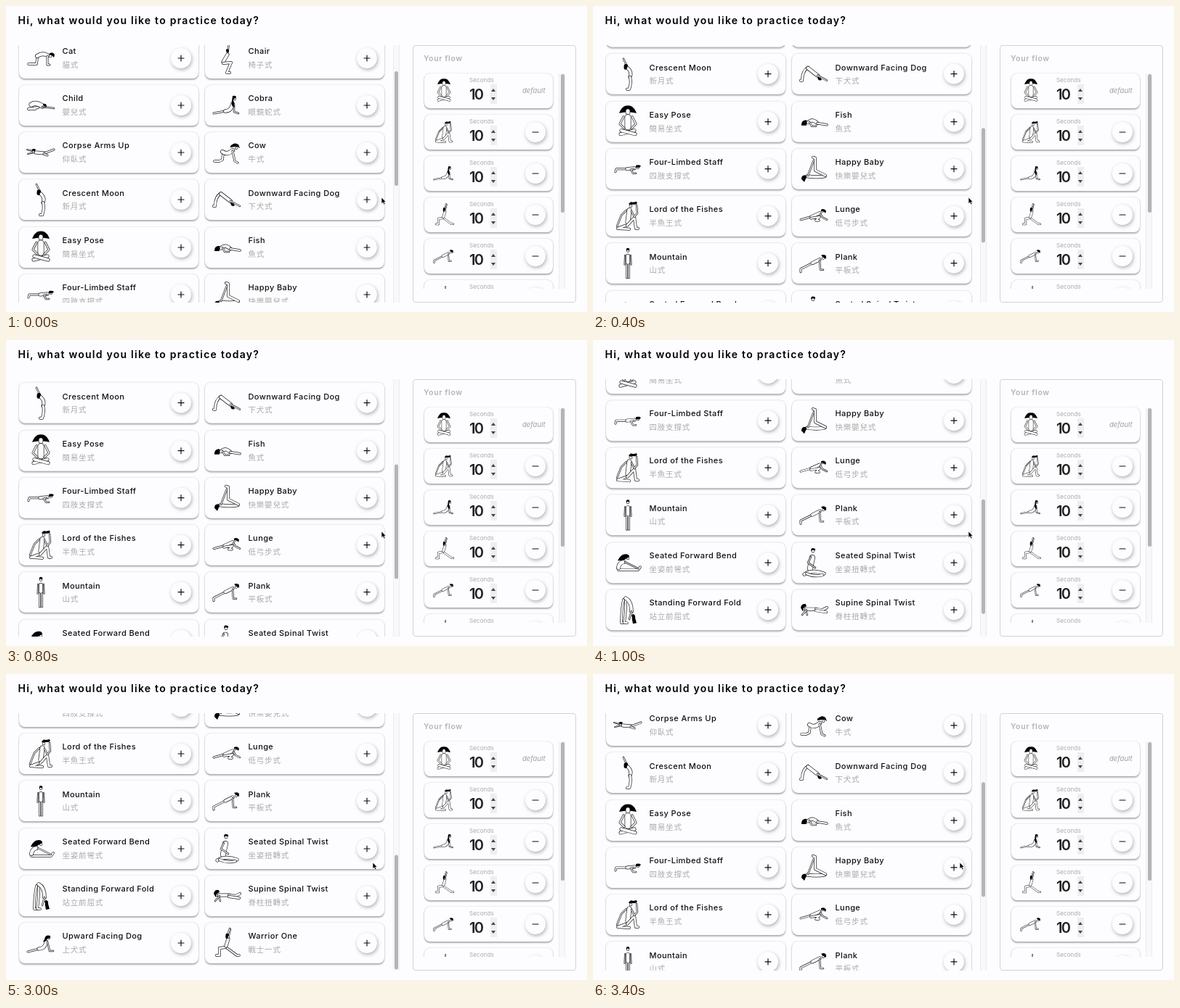
An HTML page for the animation above (3500 ms loop, 800 by 422 pixels).

```html
<!DOCTYPE html>
<html lang="en">
<head>
<meta charset="utf-8">
<title>Yoga flow</title>
<style>
html, body { margin: 0; width: 100%; height: 100%; overflow: hidden; background: #fdfcfe; }
body { position: relative; font-family: Poppins, Inter, sans-serif; color: #111; }
body *, svg { position: absolute; box-sizing: border-box; white-space: nowrap; }
svg * { position: static; }
h1, h2 { margin: 0; line-height: 20px; }
h1 { left: 16.5px; top: 10px; font-size: 14px; font-weight: 600; letter-spacing: 1.25px; color: #000; }
h2 { left: 14px; top: 8px; font-size: 10.5px; font-weight: 600; letter-spacing: .65px; color: #b4b4b6; }
#grid { left: 10px; top: 54px; width: 522px; height: 355px; overflow: hidden; }
#panel { left: 560px; top: 54px; width: 225px; height: 355px; border: 1px solid #d2d1d4; border-radius: 4px; }
#flow { left: 8px; top: 37px; width: 190px; height: 298px; overflow: hidden; }
.card { border-radius: 8px; background: #fdfcfe; box-shadow: 0 2px 2px rgba(0,0,0,.28), 0 0 2px rgba(0,0,0,.22); }
.pose { width: 247px; height: 56px; }
.step { left: 7px; width: 177px; height: 48px; }
.pose .figure { left: 6px; top: 0; width: 48px; height: 56px; }
.step .figure { left: 9px; top: 3px; width: 36px; height: 42px; }
.name, .zh { left: 59.5px; line-height: 16px; }
.name { top: 10.2px; font-size: 11px; font-weight: 500; letter-spacing: .4px; }
.zh { top: 29px; font: 10.5px/16px "Noto Sans CJK TC", "Noto Sans CJK", sans-serif; letter-spacing: .8px; color: #aaa; }
.btn { width: 28px; height: 28px; border-radius: 50%; background: #fdfcfe; box-shadow: 1px 2px 5px rgba(0,0,0,.3); stroke: #111; stroke-width: 1.2; }
.pose .btn { left: 209px; top: 14px; }
.step .btn { left: 139px; top: 10px; }
.sec { left: 62px; top: 3px; font-size: 8px; line-height: 12px; letter-spacing: .1px; color: #a8a8aa; }
.num { left: 62px; top: 17px; font-size: 20px; line-height: 24px; font-weight: 600; letter-spacing: -1.6px; color: #222; }
.spin { left: 91px; top: 15px; width: 9px; height: 27px; background: #eeeef0; }
.spin::before, .spin::after { content: ""; position: absolute; left: 1px; border: solid transparent; border-width: 0 3.5px; }
.spin::before { top: 6px; border-bottom: 4px solid #444; }
.spin::after { top: 18px; border-top: 4px solid #444; }
.def { left: 135px; top: 16px; font-size: 9.5px; line-height: 16px; font-style: italic; color: #a0a0a2; }
.track { width: 9px; background: #f8f7f9; border: solid #ecebed; border-width: 0 1px; }
.thumb { left: 1px; width: 5px; border-radius: 3px; background: #b4b3b6; }
#cursor { left: 0; top: 0; width: 8px; height: 11px; overflow: visible; }
</style>
</head>
<body>
<h1>Hi, what would you like to practice today?</h1>
<div id="grid"><div id="list"></div></div>
<div class="track" style="left:533px;top:54px;height:355px"><div class="thumb" id="thumb" style="top:36px;height:158px"></div></div>
<div id="panel">
  <h2>Your flow</h2>
  <div id="flow"></div>
  <div class="track" style="left:200px;top:38px;height:297px"><div class="thumb" style="left:2px;top:1px;height:191px"></div></div>
</div>
<svg id="cursor" viewBox="0 0 8 11"><path d="M0 0V8.5L2 6.8L3.5 10L5 9.3L3.6 6.2H6.2Z" fill="#000" stroke="#fff" stroke-width=".6"/></svg>
<script>
// Each figure is a list of strokes "width + path", drawn as outlined limbs; width 0 is solid hair.
const poses = [
  ["Cat", "貓式", "3.5M-17 8H-6L-5-1|6M-5-3Q2-8 9-4|3M9-3L9 9H12|4.5M13-3h0|0M11-6q5-4 8 1l-1 4-3-3z"],
  ["Chair", "椅子式", "2.5M1-6L3-20|5M1-5L-5 5|4M-5 7L6 6L0 20H4|4M1-10h0|0M-1-12q3-2 4 1l-1 3q-3 0-3-4z"],
  ["Child", "嬰兒式", "4M-8 5H-17L-4 3|7M-13-1Q-7-5 2 1|2.5M2 2L18 4|4.5M5 1h0|0M3-2q5-1 5 4-4 1-5-4z"],
  ["Cobra", "眼鏡蛇式", "3M-18 11L-2 8|5.5M-2 8Q6 8 8-2|2.5M10-2L10 9L16 11|4M11-9h0|0M8-13q5-1 5 2l-4 3 1 5 1 6q-6-2-4-9z"],
  ["Corpse Arms Up", "仰臥式", "2M-9-1L-19-4|2M-9 0L-18 2|5M-7 0L5 1|3M5 1L18-4|3M4 2L9 4|4M-10-1h0|0M-13-4q4-2 6 0l-2 3z"],
  ["Cow", "牛式", "3.5M-17 12H-10L-6 10L-5 0|6M-6-1Q1 4 8-3|3M8-2L11 12L15 14|4M13-6h0|0M5-9q6-6 11-2l2 5q-4-3-7-2l-6 1z"],
  ["Crescent Moon", "新月式", "2.5M0-8L-6-21|5M0-8Q6-2 3 4|4M3 4Q5 12 2 21H-1|4M-2-11h0|0M-5-13q4-2 5 1l-2 6q-5 1-3-7z"],
  ["Downward Facing Dog", "下犬式", "4M-8-9Q-16-4-16 9H-18|5.5M-8-8L5 2|2.5M5 2L18 9|4M8 6h0|0M5 4q5 1 6 4-5 3-6-4z"],
  ["Easy Pose", "簡易坐式", "0M-12-12Q-9-20-4-22Q0-23 4-22Q9-20 12-12Q0-15-12-12z|6.5M0-15v2|9M0-6V7|3M-6-7L-11 3L-5 9|3M6-7L11 3L5 9|5M-10 17L9 12|5M10 17L-9 12"],
  ["Fish", "魚式", "5M-8 1Q-2-5 5 2|3.5M5 2L18 4|2.5M-6 0L-3 6H3|4.5M-11 0h0|0M-17 5q0-8 7-7l0 7z"],
  ["Four-Limbed Staff", "四肢支撐式", "3M-17 4L-16 0L0 0|5M-1 0L9-1|2.5M8 0L4 1L7 6H11|4M14-2h0|0M11-5q5-1 7 1l-2 2-5 0z"],
  ["Happy Baby", "快樂嬰兒式", "5M-9 10Q4 12 15 10|4M16 9L2 2L2-15L-1-16|2.5M-8 9L0-12|4.5M-12 11h0|0M-17 14q0-6 6-5l1 2-3 7z"],
  ["Lord of the Fishes", "半魚王式", "2.5M-2-8L-9-1L-15 14|7M2-8L0 8|4M-3 13L-14 17L2 18|4M-1 13L9 2L11 17H14|2.5M5-7L9 1L13-4L12-15|4.5M4-14h0|0M1-16q2-5 6-3l5-1q2 3-2 4l-4 0z"],
  ["Lunge", "低弓步式", "3M-18 5L-4 1|5M-3 1L8-4|3.5M-4 3L8 1L3 6H7|2.5M9-3L12 2L18 5|4M12-7h0|0M10-9q5-2 7 2l-1 3q-2-3-6-3z"],
  ["Mountain", "山式", "4M0-17h0|6M0-10V0|2M-4-11L-4.500 2|2M4-11L4.500 2|3M-1.500 2V20|3M1.500 2V20|0M-2-17q-1-4 2-4 3 0 2 4l-2-2z"],
  ["Plank", "平板式", "3M-18 12V8L-2 0|5M-2 0L8-5|2.5M8-4L9 9H13|4M13-7h0|0M10-11q5-2 7 1l0 4-4-2z"],
  ["Seated Forward Bend", "坐姿前彎式", "3.5M-13 10L14 10L17 6|6M-13 7Q-12 0-6-1|2.5M-4-1L14 8|4M0-6h0|0M-14-3q4-9 11-9 5 0 5 4l-4 2q-5 4-12 3z"],
  ["Seated Spinal Twist", "坐姿扭轉式", "8M-2-7Q-4 2-5 8|2.5M-4-8L-8 0L2 7|5M-13 16Q-2 9 14 15|4M12 17Q0 20-10 15|4.5M-1-16h0|0M-4-16q0-5 4-4 3 1 2 3l-4-1z"],
  ["Standing Forward Fold", "站立前屈式", "3.5M-6-14Q-9 0-9 18H-5|3.5M-3-15Q-2-2-5 18H-1|5.5M-3-16Q5-12 5 2|2.5M5 2L2 13|4M7 8h0|0M6 6q5 0 4 5l2 7-5 1q-2-7-1-13z"],
  ["Supine Spinal Twist", "脊柱扭轉式", "2.5M-12-2L-9 7|5M-11-1L3-1|4M3-1L12 0L18-3|4M3 1L17 3|2.5M-10 0L-16 7|4M-14-1h0|0M-18-3q1-6 7-5l1 3-4 2-1 5z"],
  ["Upward Facing Dog", "上犬式", "3M-18 12L-2 8|5M-3 8Q6 8 7-2|2.5M9-2L12 11H17|4M11-7h0|0M5-5q1-7 8-5l0 3-4 1q-2 5-6 4z"],
  ["Warrior One", "戰士一式", "3.5M-1 6L14 17H17|4M-2 6L-10 7L-10 17H-14|5M2-6L-1 4|2.5M2-7L5-19|2.5M0-7L4-20|4M1-11h0|0M-1-13q4-1 4 2l-3 5q-3-1-1-7z"]
];

function svg(name, body) {
  return `<svg class="${name}" viewBox="${name === "btn" ? "-14 -14 28 28" : "-24 -28 48 56"}" fill="none" stroke-linecap="round" stroke-linejoin="round">${body}</svg>`;
}

function figure(strokes) {
  return svg("figure", strokes.split("|").map(s => {
    const w = parseFloat(s), d = s.slice(s.indexOf("M"));
    const line = (color, width) => `<path d="${d}" stroke="${color}" stroke-width="${width}"/>`;
    return w ? line("#222", w) + line("#fdfcfe", w - 1.4) : `<path d="${d}" fill="#000"/>`;
  }).join(""));
}

const button = d => svg("btn", `<path d="${d}"/>`);
const $ = id => document.getElementById(id);
const PITCH = 65.23;

$("list").innerHTML = poses.map(([name, zh, art], i) => `
  <div class="card pose" style="left:${8 + i % 2 * 256}px;top:${(i >> 1) * PITCH - 10.2}px">
    ${figure(art)}<span class="name">${name}</span><span class="zh">${zh}</span>${button("M-4 0H4M0-4V4")}
  </div>`).join("");

const steps = ["Easy Pose", "Lord of the Fishes", "Cobra", "Warrior One", "Plank", "Chair"];
$("flow").innerHTML = steps.map((name, i) => `
  <div class="card step" style="top:${1 + i * 57}px">
    ${figure(poses.find(p => p[0] === name)[2])}
    <span class="sec">Seconds</span><span class="num">10</span><div class="spin"></div>
    ${i ? button("M-4 0H4") : '<span class="def">default</span>'}
  </div>`).join("");

// Scroll moves: start, end, from, to, easing
const moves = [
  [0, 400, 0, 173.3, u => u * u * (3 - 2 * u)],
  [600, 800, 173.3, 180.3, u => u * u],
  [800, 1200, 180.3, 353, u => 1 - (1 - u) ** 1.385],
  [3000, 3500, 353, 0, u => u ** 2.08]
];

function scrollAt(t) {
  const [a, b, from, to, ease] = moves.filter(m => m[0] <= t).pop();
  return from + (to - from) * ease(Math.min(1, (t - a) / (b - a)));
}

function draw(now) {
  const t = Math.floor(now % 3500 / 100) * 100;   // the screen refreshes ten times a second
  const s = scrollAt(t);
  $("list").style.transform = `translateY(${-s}px)`;
  $("thumb").style.transform = `translateY(${s * .452}px)`;
  $("cursor").style.transform = t < 3000 ? "translate(517px,264px)" : "translate(505px,260px)";
}

const start = performance.now();
function loop() {
  draw(performance.now() - start);
  requestAnimationFrame(loop);
}
loop();
</script>
</body>
</html>
```
